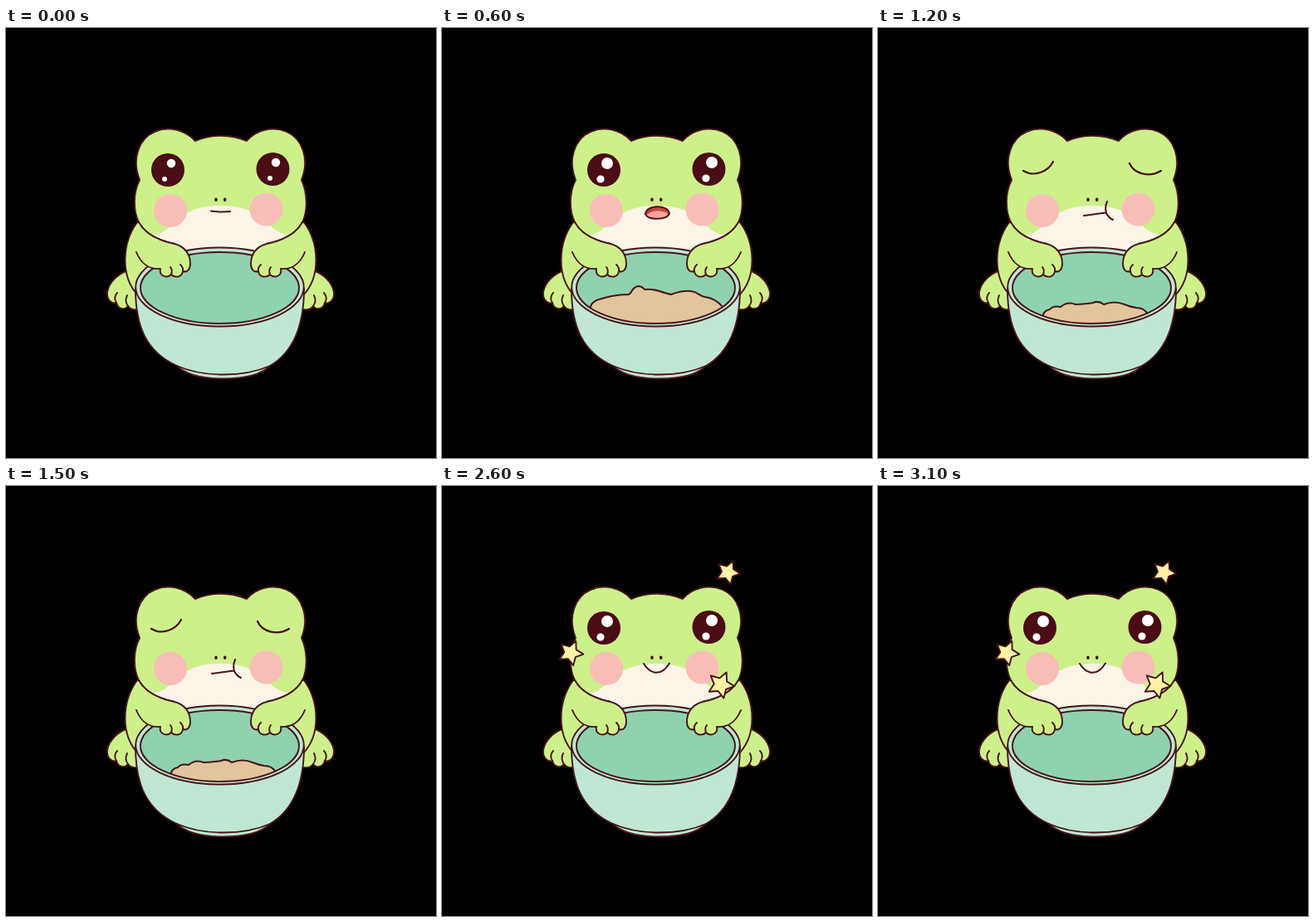
An HTML page that plays this animation: 518x518 px, repeating every 3300 ms.

```html
<!DOCTYPE html>
<html lang="en">
<head>
<meta charset="utf-8">
<title>Frog and bowl</title>
<style>
  html, body { margin: 0; width: 100%; height: 100%; overflow: hidden; background: #000; }
  svg { display: block; width: 100vw; height: 100vh; }
  .line { stroke: #47141a; stroke-width: 1.9; stroke-linecap: round; stroke-linejoin: round; }
  .open { fill: none; }
  .skin { fill: #cdf08b; }
  .food { fill: #e1c59d; }
</style>
</head>
<body>
<svg viewBox="0 0 518 518">
  <defs>
    <path id="headShape" d="M228 136C248 128 270 128 290 136C302 122 322 118 338 125C357 133 366 158 356 183C363 198 364 220 357 234C349 249 333 256 314 260V285H203V260C184 256 168 249 160 234C153 220 153 198 161 183C151 158 160 133 179 125C195 118 215 122 228 136Z"/>
    <ellipse id="innerShape" cx="257.5" cy="313" rx="95.5" ry="43"/>
    <clipPath id="headClip"><use href="#headShape"/></clipPath>
    <clipPath id="innerClip"><use href="#innerShape"/></clipPath>
    <g id="foot" class="line">
      <path class="skin" d="M147 292C135 296 124 306 122 318C121 327 127 333 133 331C135 339 143 340 147 335C150 340 157 340 161 338L166 318"/>
      <path class="open" d="M133 331C130 327 131 322 134 319M147 335C144 331 144 326 146 322"/>
    </g>
    <g id="arm" class="line">
      <path class="skin" d="M160 234C168 249 184 256 203 260C215 263 222 272 222 284C222 291 218 295 213 293C212 301 203 301 199 297C194 302 184 299 186 290C174 291 163 285 157 270"/>
      <path class="open" d="M199 297Q201 292 198 288M213 293Q214 289 210 285"/>
    </g>
  </defs>

  <rect width="518" height="518"/>
  <use href="#foot"/>
  <use href="#foot" transform="matrix(-1 0 0 1 517 0)"/>
  <path class="line skin" d="M158 234C139 260 138 300 159 322H358C379 300 378 260 359 234Z"/>

  <use href="#headShape" class="skin"/>
  <path clip-path="url(#headClip)" fill="#fdf4e8" d="M176 250C192 248 197 238 210 228C222 219 238 214 258 214C280 214 296 219 306 228C318 237 326 248 342 250L330 290H185Z"/>
  <use href="#headShape" class="line open"/>
  <g fill="#f9bdb7"><circle cx="198" cy="220" r="20"/><circle cx="313.5" cy="218.5" r="20"/></g>
  <g fill="#47141a"><ellipse cx="253" cy="206.7" rx="1.8" ry="2.2"/><ellipse cx="263.7" cy="206.7" rx="1.8" ry="2.2"/></g>

  <g id="eyes">
    <g fill="#4a0c15"><circle cx="195" cy="171" r="20"/><circle cx="321.5" cy="170" r="20"/></g>
    <g id="glints" fill="#fff">
      <circle cx="199" cy="163"/><circle cx="325" cy="162"/>
      <circle cx="191" cy="182"/><circle cx="318" cy="181"/>
    </g>
  </g>
  <path id="lids" class="line open" style="stroke-width:2.2" d="M175 172C188 180 205 173 211 161M303 163C308 175 326 181 341 172"/>

  <path id="mouth" class="line open" style="stroke-width:2"/>
  <g id="gape">
    <path class="line" fill="#c9443f" d="M245 224C246 213 271 212 274 223C273 232 247 232 245 224Z"/>
    <path fill="#f8a69c" d="M247 225C252 219 267 219 272 224C270 230 249 230 247 225Z"/>
  </g>

  <path class="line" fill="#c0e7d4" d="M156 314C156 358 168 390 206 407C216 417 232 422.5 262 422.5C292 422.5 308 417 318 407C347 390 359 358 359 314Z"/>
  <path class="line open" d="M206 407C238 421 286 421 318 407"/>
  <ellipse class="line" cx="257.5" cy="312" rx="101.3" ry="47.5" fill="#bfe6d4"/>
  <use href="#innerShape" fill="#8fd2af"/>
  <path id="food" class="line food" clip-path="url(#innerClip)" style="stroke-width:2"/>
  <use href="#innerShape" class="line open"/>
  <use href="#arm"/>
  <use href="#arm" transform="matrix(-1 0 0 1 517 0)"/>
  <g id="stars" class="line" fill="#fdf2a6"></g>
</svg>
<script>
  const LOOP = 3300;
  const chew = 'M248 226L274 222.5M276 209Q273 216 275 223Q278 229 283 231';
  const chewLow = 'M249 226L275 221.5M277 208Q273 213 275 219Q273 228 283 233';
  const scenes = [
    { at: 0, mouth: 'M247 220.5Q258 222 270 221', glints: [5.2, 3] },
    { at: 600, glints: [7, 4.6], gape: true,
      food: 'M178 340C179 327 190 327 204 323Q214 321 225 321C229 319 229 312 236 311Q241 311 244 315Q253 314 262 317Q271 320 276 321C284 318 292 316 300 317C309 318 309 323 317 324Q330 326 338 336V370H178Z' },
    { at: 1200, mouth: chew, shut: true,
      food: 'M198 350Q199 340 207 339Q211 334 220 336Q228 329 238 333Q249 333 259 331Q266 328 272 333Q285 328 297 333Q304 336 311 337Q321 337 325 345V370H198Z' },
    { at: 1900, mouth: chewLow, shut: true,
      food: 'M231 357Q233 350 243 350Q248 346 255 349Q262 346 269 349Q277 345 284 348Q290 345 297 347Q304 347 308 353V370H231Z' },
    { at: 2600, mouth: 'M243 214C252 228.5 265 228.5 274 213.5', glints: [7, 4.6], stars: true }
  ];

  const el = id => document.getElementById(id);
  const show = (id, on) => { el(id).style.display = on ? '' : 'none'; };

  function starPath(cx, cy, radius, tilt) {
    const points = Array.from({ length: 10 }, (_, i) => {
      const r = i % 2 ? radius * 0.5 : radius;
      const a = (i * 36 - 90 + tilt) * Math.PI / 180;
      return (cx + r * Math.cos(a)).toFixed(1) + ' ' + (cy + r * Math.sin(a)).toFixed(1);
    });
    return `<path d="M${points.join('L')}Z"/>`;
  }
  el('stars').innerHTML = starPath(155, 201, 15.5, 24) + starPath(344.5, 104, 15, 24) + starPath(336, 239.5, 16.5, 24);

  function render(time) {
    const t = time % LOOP;
    const scene = scenes.filter(s => s.at <= t).pop();
    show('eyes', !scene.shut);
    show('lids', scene.shut);
    show('gape', scene.gape);
    show('stars', scene.stars);
    el('mouth').setAttribute('d', scene.mouth || '');
    el('food').setAttribute('d', scene.food || '');
    if (scene.glints) {
      [...el('glints').children].forEach((c, i) => c.setAttribute('r', scene.glints[i >> 1]));
    }
  }

  const start = performance.now();
  function tick() {
    render(performance.now() - start);
    requestAnimationFrame(tick);
  }
  tick();
</script>
</body>
</html>
```
